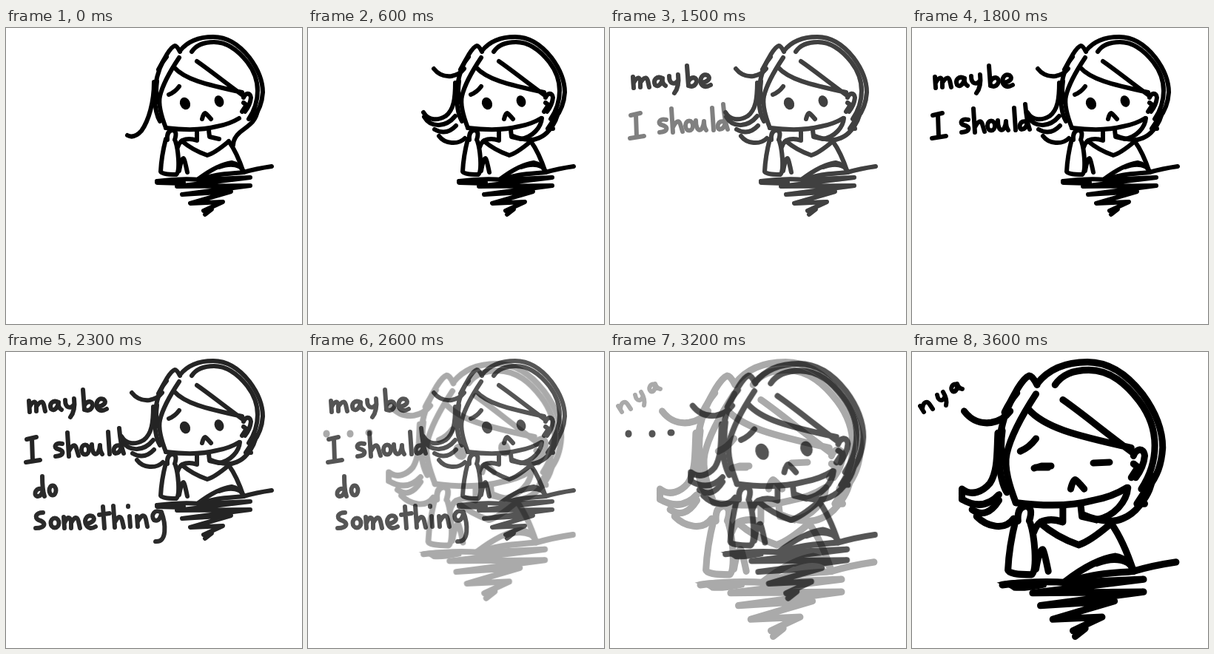
Write an HTML page without scripts that moves like this. It is 400x400 px and loops after 4600 ms.

```html
<!DOCTYPE html>
<html lang="en">
<head>
<meta charset="utf-8">
<title>Maybe I should do something</title>
<style>
  html, body { margin: 0; width: 100%; height: 100%; overflow: hidden; background: #fff; }
  svg { display: block; width: 100%; height: 100%; filter: blur(.5px); }
  path, .ring { fill: none; stroke: #000; stroke-width: 6; stroke-linecap: round; stroke-linejoin: round; }
  .ink { fill: #000; stroke: none; }
  .bold { stroke-width: 9; }

  /* Transparent pages cross-fade on white: six steps of 100 ms in, six out */
  .page { opacity: 0; animation: 4.6s steps(6, start) infinite; }
  #sketch { animation-name: page0; }
  #hair   { animation-name: page1; }
  #maybe  { animation-name: page2; }
  #should { animation-name: page3; }
  #thing  { animation-name: page4; }
  #dots   { animation-name: page5; }
  #nya    { animation-name: page6; }
  @keyframes page0 { 0%, 2.17%  { opacity: 1; } 15.21%, to { opacity: 0; } }
  @keyframes page1 { 0%, 2.17%  { opacity: 0; } 15.21% { opacity: 1; } 28.25%, to { opacity: 0; } }
  @keyframes page2 { 0%, 15.21% { opacity: 0; } 28.25% { opacity: 1; } 41.29%, to { opacity: 0; } }
  @keyframes page3 { 0%, 28.25% { opacity: 0; } 41.29% { opacity: 1; } 54.33%, to { opacity: 0; } }
  @keyframes page4 { 0%, 41.29% { opacity: 0; } 54.33% { opacity: 1; } 67.37%, to { opacity: 0; } }
  @keyframes page5 { 0%, 54.33% { opacity: 0; } 67.37% { opacity: 1; } 80.41%, to { opacity: 0; } }
  @keyframes page6 { 0%, 67.37% { opacity: 0; } 80.41%, to { opacity: 1; } }
</style>
</head>
<body>
<svg viewBox="0 0 400 400" role="img" aria-label="A bored girl leans on a desk: maybe I should do something ... nya">
  <defs>
    <g id="girl">
      <!-- hair -->
      <path d="M235 31C246 17 262 12 280 12C302 12 318 26 329 40C341 56 347 71 347 87C346 102 342 112 334 122"/>
      <path d="M251 32C257 23 267 19 281 19C301 19 315 32 326 46C336 59 340 71 340 85C340 99 336 111 328 123"/>
      <path d="M235 32Q231 24 228 24C222 26 213 42 208 54C203 68 200 82 201 96Q202 116 208 126"/>
      <path d="M234 40C224 55 212 75 208 92C205 105 211 122 216 135"/>
      <path d="M206 56Q211 46 217 39M204 72Q202 86 204 100"/>
      <path d="M227 53C241 69 268 76 319 87M258 45C277 58 296 74 320 91"/>
      <!-- face -->
      <path d="M216 135C240 138 266 138 285 133Q302 130 315 122"/>
      <path d="M321 94C323 88 330 86 331 94Q330 104 323 113M321 101L325 104L319 113"/>
      <path d="M220 90Q228 87 234 79M265 123Q267 115 269 115Q271 116 277 123"/>
      <!-- neck and collar -->
      <path d="M258 138L258 152Q247 148 238 152Q234 155 232 161"/>
      <path d="M238 153Q252 165 272 172Q282 169 300 154M274 138L275 147L288 150"/>
      <path d="M301 153Q312 168 321 195"/>
      <!-- arms -->
      <path d="M218 151Q217 139 225 138Q232 139 228 151"/>
      <path d="M216 150Q210 173 209 194Q210 198 230 198Q234 196 233 177Q232 162 229 153"/>
      <path d="M234 193Q237 176 240 176Q241 176 245 195"/>
      <path d="M260 204C272 195 290 184 305 182Q316 184 321 194"/>
      <path d="M260 206C280 197 300 197 321 195Q338 190 359 187"/>
      <path d="M288 188Q304 182 315 187"/>
      <!-- desk scribble -->
      <path d="M204 207Q235 203 262 205L330 202L231 214L330 213L238 225L304 221L249 237L293 235L267 247L278 245L269 252"/>
    </g>

    <g id="open">
      <ellipse class="ink" cx="242" cy="102" rx="6.8" ry="8.6" transform="rotate(-24 242 102)"/>
      <ellipse class="ink" cx="288" cy="99" rx="6.2" ry="8" transform="rotate(-20 288 99)"/>
    </g>

    <path id="blob" d="M205 208L239 209" style="stroke-width: 8"/>

    <!-- wisps on both sides, shared by every size -->
    <g id="wisps">
      <path d="M170 55C177 64 185 66 194 65Q205 63 211 55"/>
      <path d="M316 122C315 134 304 147 288 150"/>
      <path d="M338 112C337 124 331 132 326 138C318 148 306 152 298 151Q286 150 277 146"/>
      <path d="M332 124L324 136L331 136"/>
    </g>

    <g id="small">
      <use href="#girl"/><use href="#blob"/><use href="#open"/><use href="#wisps"/>
      <path d="M156 114C163 126 176 125 186 119C197 111 199 95 199 74"/>
      <path d="M157 120C165 134 185 136 199 119"/>
      <path d="M171 137Q187 146 200 132"/>
      <path d="M177 146C185 157 203 158 212 149"/>
    </g>

    <g id="large">
      <use href="#girl"/><use href="#wisps"/>
      <path class="ink" d="M199 205Q212 201 245 203L243 209Q225 213 214 212Q209 208 199 205Z"/>
      <path d="M168 132V123C177 130 187 125 193 118C200 107 199 92 200 74"/>
      <path d="M168 132Q187 143 201 128"/>
      <path d="M177 141Q190 150 201 133"/>
      <path d="M181 147C190 156 206 160 214 149"/>
    </g>

    <g id="w1">
      <path d="M31 66L32 81M32 74Q38 63 41 71V80M41 74Q48 63 51 71L53 80"/>
      <path d="M71 68C63 64 58 70 61 77C65 81 70 75 71 68Q70 75 75 78"/>
      <path d="M80 65C80 77 88 76 91 72M92 63Q94 79 87 88"/>
      <path d="M104 51L106 78M106 72C111 64 118 67 117 73Q114 81 106 78"/>
      <path d="M123 74C132 73 137 68 132 64C125 61 121 68 123 75Q127 82 136 77"/>
    </g>
    <g id="w2">
      <path d="M28 118L41 115M35 117L36 147M27 149L46 146"/>
      <path d="M76 124C67 122 63 129 70 131C79 133 79 140 67 141"/>
      <path d="M83 109L85 141M85 134Q92 121 95 130L98 140"/>
      <ellipse class="ring" cx="107" cy="132" rx="5" ry="6.5"/>
      <path d="M116 125C116 143 126 141 127 126Q127 134 130 138"/>
      <path d="M138 108L140 138"/>
      <path d="M155 127C146 123 143 135 148 137Q154 137 156 128M153 103Q155 126 159 137"/>
    </g>
    <g id="w3">
      <path d="M50 186C41 181 36 193 42 195Q48 196 50 186M49 168Q49 186 52 195"/>
      <ellipse class="ring" cx="63" cy="187" rx="4.5" ry="6.5"/>
      <path d="M50 217C40 217 38 224 44 227C55 230 54 238 40 238"/>
      <ellipse class="ring" cx="66" cy="231" rx="5.5" ry="6.5"/>
      <path d="M78 223L79 238M79 231Q85 218 88 229V238M88 231Q95 218 98 229L100 238"/>
      <path d="M108 232C117 231 122 226 117 222C110 219 105 226 108 233Q112 241 121 236"/>
      <path d="M131 209L133 238M126 220L140 218"/>
      <path d="M145 208L147 237M147 230Q154 217 157 228L159 237"/>
      <path d="M167 222L168 236M165 208V209"/>
      <path d="M177 222L178 236M178 229Q186 215 189 226L191 236"/>
      <path d="M210 217C201 211 195 221 200 227C206 230 210 223 210 216C216 232 218 258 202 256"/>
    </g>
  </defs>

  <g class="page" id="sketch">
    <use href="#girl"/><use href="#blob"/><use href="#open"/>
    <path d="M200 73C200 100 193 125 183 139Q173 150 164 145"/>
    <path d="M340 111C338 127 327 132 316 141Q307 149 307 158M330 122L338 118"/>
  </g>
  <g class="page" id="hair"><use href="#small"/></g>
  <g class="page" id="maybe"><use href="#small"/><use href="#w1"/></g>
  <g class="page" id="should"><use href="#small"/><use href="#w1"/><use href="#w2"/></g>
  <g class="page" id="thing"><use href="#small"/><use href="#w1"/><use href="#w2"/><use href="#w3"/></g>

  <g class="page" id="dots">
    <g transform="matrix(1.303 0 0 1.32 -109.8 0)"><use href="#large"/><use href="#open"/></g>
    <path class="bold" d="M25 110V111M57 110V111M82 109H83"/>
  </g>

  <g class="page" id="nya">
    <use href="#large" transform="matrix(1.515 0 0 1.545 -187 -5)"/>
    <path class="bold" d="M165 157L175 154L188 154M167 156L184 156M245 150L267 149"/>
    <path d="M11 73L16 81M14 77C15 66 21 66 24 71L28 77"/>
    <path d="M34 58C36 68 42 66 44 61M42 54Q48 64 46 72"/>
    <path d="M61 44C54 42 51 50 55 53C59 55 62 49 61 43Q63 49 68 50"/>
  </g>
</svg>
</body>
</html>
```
